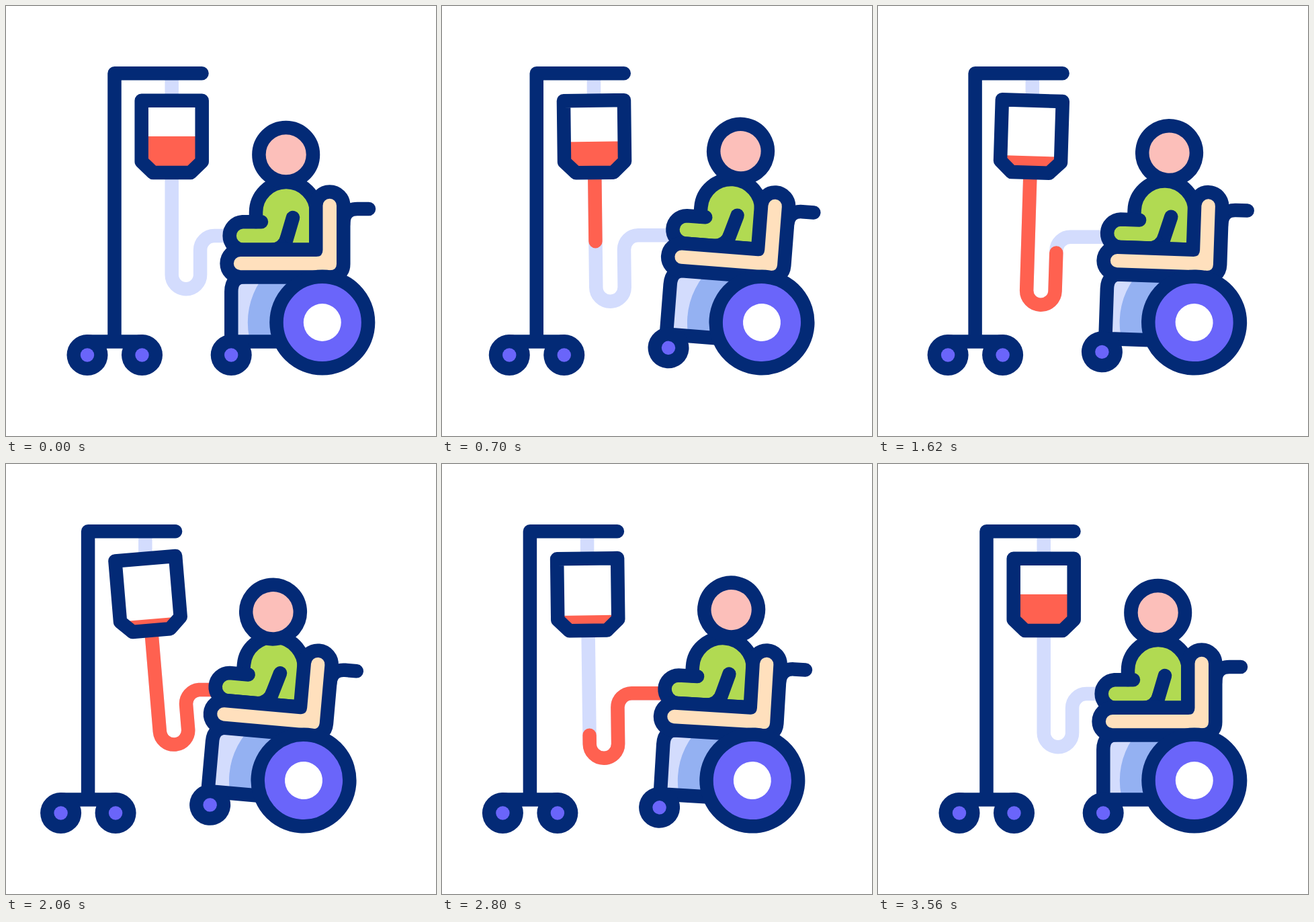
An HTML page that plays this animation: 640x640 px, repeating every 3600 ms.

```html
<!DOCTYPE html>
<html lang="en">
<head>
<meta charset="utf-8">
<title>Patient in a wheelchair</title>
<style>
  html, body { margin: 0; width: 100%; height: 100%; overflow: hidden; background: #fff; }
  svg { display: block; width: 100vw; height: 100vh; }
  .line { fill: none; stroke: #032a76; stroke-width: 20.5; stroke-linecap: round; stroke-linejoin: round; }
  .tube { fill: none; stroke: #d3dcfd; stroke-width: 20.5; stroke-linejoin: round; }
  .blood { stroke: #ff6150; stroke-linecap: round; }
  .edge { stroke: #032a76; stroke-width: 41; stroke-linejoin: round; }
  .navy { fill: #032a76; }
  .violet { fill: #6a65fa; }
  .skin { fill: #fcbfba; }
</style>
</head>
<body>
<svg viewBox="0 0 640 640">
  <defs>
    <path id="pouch" d="M201.7 140.7H291.7V231.5L274.6 248H218.8L201.7 231.5Z"/>
    <path id="leg" d="M335 499V425Q335 403 357 403H440V499Z"/>
    <path id="seat" d="M349 373H462Q471.5 373 471.5 363V297A10.2 10.2 0 0 1 492 297V384Q492 393.3 482 393.3H349A10.1 10.1 0 0 1 349 373Z"/>
    <clipPath id="inPouch"><use href="#pouch"/></clipPath>
    <clipPath id="inLeg"><use href="#leg"/></clipPath>
    <g id="caster">
      <circle class="navy" r="30.5"/>
      <circle class="violet" r="10.2"/>
    </g>
  </defs>

  <g id="stand">
    <path class="tube" d="M246.7 100V141"/>
    <path class="line" d="M161.5 499.5V100.3H291.5M121 499.5H202.5"/>
    <use href="#caster" x="121" y="519.5"/>
    <use href="#caster" x="202.5" y="519.5"/>
  </g>

  <g id="bag">
    <path id="tube" class="tube"/>
    <path id="blood" class="tube blood" pathLength="1"/>
    <g clip-path="url(#inPouch)">
      <rect x="195" y="135" width="105" height="120" fill="#fff"/>
      <rect id="level" x="195" width="105" height="80" fill="#ff6150"/>
    </g>
    <use href="#pouch" class="line"/>
  </g>

  <g id="chair">
    <g id="body">
      <g clip-path="url(#inLeg)">
        <use href="#leg" fill="#d3dcfd"/>
        <circle id="shade" cy="471" r="111" fill="#94b1f2"/>
      </g>
      <path class="line" d="M415 499.5H335.3V425Q335.3 402.8 357 402.8H470"/>
      <path class="line" d="M502 326Q502 302 523 302H540"/>

      <path fill="#b1da52" d="M378 307A39 39 0 0 1 456 307V358H352A14 14 0 0 1 352 328H378Z"/>
      <path class="line" d="M372 321V307A45 45 0 0 1 462 307V350"/>
      <path class="line" d="M380 321.3H352A20.8 20.8 0 0 0 352 362.8H460"/>
      <path class="line" d="M427 315L415.5 354"/>
      <path class="navy" d="M394 353Q406 352.5 409 341L420 354Z"/>

      <use href="#seat" class="edge"/>
      <use href="#seat" fill="#ffe0bd"/>
      <circle id="head" class="line skin" style="fill:#fcbfba" cx="416.7" cy="221.3" r="40.3"/>
    </g>
    <use href="#caster" x="335.2" y="519.5"/>
    <circle class="line" style="fill:#6a65fa" cx="470.8" cy="471" r="68.3"/>
    <circle cx="470.8" cy="471" r="28" fill="#fff"/>
  </g>
</svg>

<script>
const LOOP = 3600, END = 3560, HALF = 540;
const HOOK = [246.7, 141], AXLE = [470.8, 471];

const $ = id => document.getElementById(id);
const set = (id, attrs) => {
  for (const k in attrs) $(id).setAttribute(k, attrs[k]);
};
const ramp = (t, a, b) => Math.min(1, Math.max(0, (t - a) / (b - a)));
const ease = (t, a, b) => {
  const p = ramp(t, a, b);
  return p * p * (3 - 2 * p);
};

// One quick swing to `first`, then even half swings between `low` and `high`, then rest.
function swing(t, lag, first, low, high) {
  const start = 2 * 430 + lag, peak = 430 + lag;
  if (t < peak) return first * ease(t, 0, peak);
  if (t < start) return first + (low - first) * ease(t, peak, start);
  const n = Math.min(4, Math.floor((t - start) / HALF));
  const a = start + n * HALF;
  const from = n % 2 ? high : low;
  const to = n === 4 ? 0 : n % 2 ? low : high;
  return from + (to - from) * ease(t, a, n === 4 ? END : a + HALF);
}

// The head rocks at the same beat, fading in and out of the resting pose.
function nod(t) {
  const rock = -7 + 17 * Math.cos(Math.PI * (t - 1750) / HALF);
  return rock * ease(t, 0, 300) * (1 - ease(t, END - 360, END));
}

function spin([x, y], [cx, cy], deg) {
  const a = deg * Math.PI / 180, c = Math.cos(a), s = Math.sin(a);
  return [cx + (x - cx) * c - (y - cy) * s, cy + (x - cx) * s + (y - cy) * c];
}

function draw(t) {
  const standX = swing(t, -12, 50, -47, 3);
  const tilt = swing(t, 45, 4.7, -5.3, 4.1);
  const slack = swing(t, 110, 28, -1, 26);
  const chairX = swing(t, 75, 31, -28.5, 6);
  const lean = swing(t, 15, 2.4, 5.6, 0.2);
  const bodyX = swing(t, 20, -2, -6.5, 9);

  set("stand", { transform: `translate(${standX})` });
  set("bag", { transform: `translate(${standX}) rotate(${tilt} ${HOOK})` });
  set("chair", { transform: `translate(${chairX}) rotate(${lean} ${AXLE})` });
  set("body", { transform: `translate(${bodyX})` });
  set("shade", { cx: AXLE[0] - bodyX });
  set("head", { transform: `rotate(${nod(t)} 432 266)` });
  set("level", { y: 194 + 40 * (ease(t, 0, 2450) - ease(t, 2500, 3500)) });

  // The tube swings with the bag; its last stretch runs level to the hand.
  const knee = spin([310, 342], HOOK, tilt);
  const hand = spin([345 + bodyX, 342], AXLE, lean);
  const end = spin([hand[0] + chairX - standX, knee[1]], HOOK, -tilt);
  const d = `M246.7 248V${400 + slack}a21.2 21.2 0 0 0 42.4 0V363a21 21 0 0 1 21 -21L${end}`;
  const from = ramp(t, 2480, 3270);
  const span = ramp(t, 200, 2110) - from;
  set("tube", { d });
  set("blood", {
    d,
    "stroke-dasharray": `${span} 2`,
    "stroke-dashoffset": -from,
    visibility: span > 0 ? "visible" : "hidden"
  });
}

const begin = performance.now();
function tick(now) {
  draw(Math.max(0, now - begin) % LOOP);
  requestAnimationFrame(tick);
}
draw(0);
requestAnimationFrame(tick);
</script>
</body>
</html>
```
